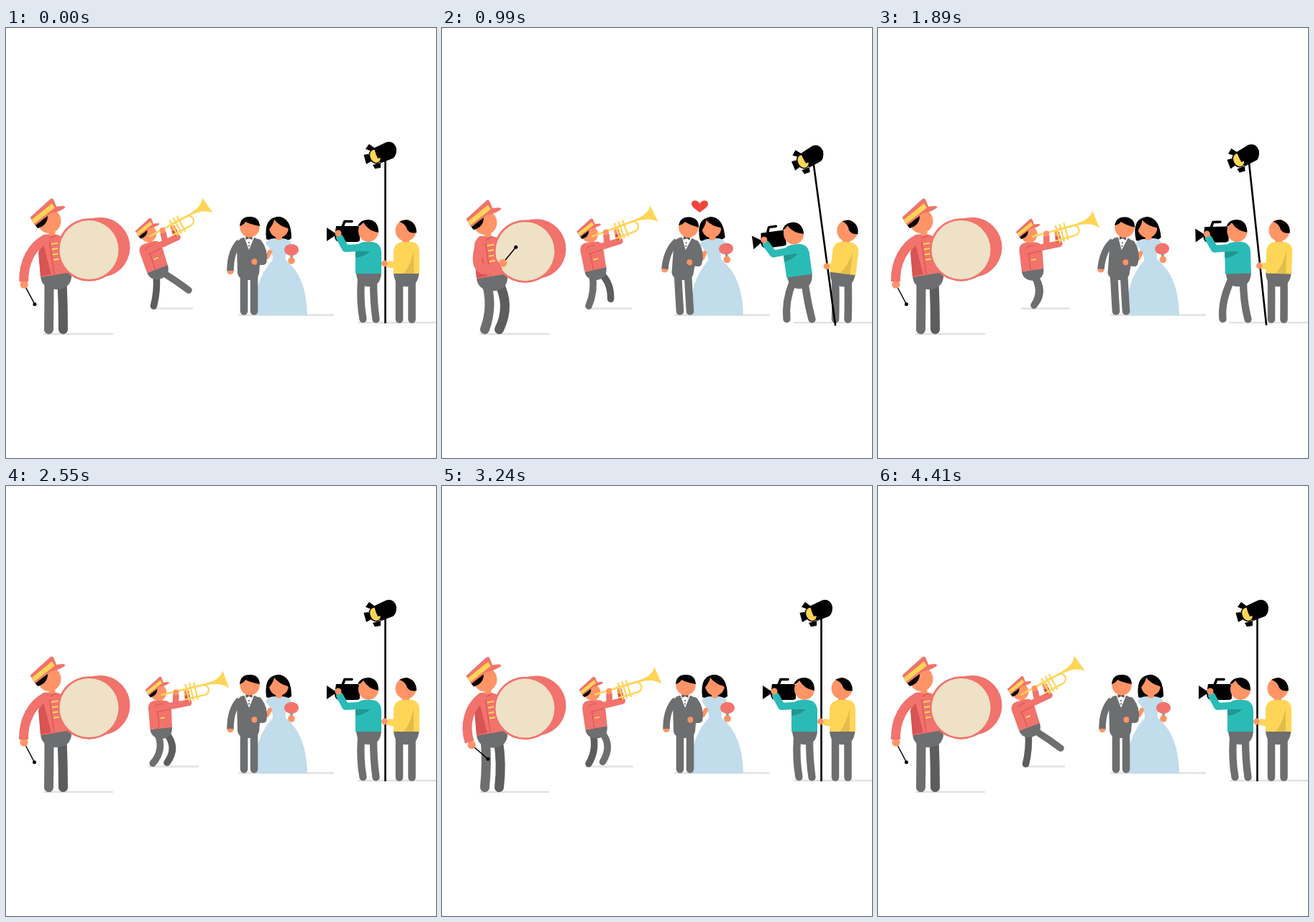
Animation of 598 by 597 pixels, one loop 4.44 s. Source, as an HTML page with a canvas:

```html
<!DOCTYPE html>
<html lang="en">
<head>
<meta charset="utf-8">
<title>Wedding procession</title>
<style>
html, body { margin: 0; width: 100%; height: 100%; overflow: hidden; background: #fff; }
canvas { display: block; }
</style>
</head>
<body>
<canvas id="stage" width="598" height="597"></canvas>
<script>
const ctx = document.getElementById('stage').getContext('2d');
const LOOP = 4440, STEP = 740, BEAT = 580;
const CORAL = '#f1736c', RED = '#d95454', YELLOW = '#ffd557', SKIN = '#ff9466',
      GREY = '#6d6e70', DARK = '#5c5d5f', TEAL = '#2bbbb6', DRESS = '#c1dceb', BLACK = '#000';

const clamp = x => Math.max(0, Math.min(1, x));
const smooth = x => (x = clamp(x), x * x * (3 - 2 * x));
const linear = x => x;
const ramp = (t, from, to) => smooth((t - from) / (to - from));

// Interpolates rows of [time, ...values].
function mix(rows, t, ease = smooth) {
  const i = rows.findIndex(r => r[0] > t);
  if (i < 0) return rows[rows.length - 1].slice(1);
  const a = rows[i - 1], b = rows[i], k = ease((t - a[0]) / (b[0] - a[0]));
  return a.slice(1).map((v, j) => v + (b[j + 1] - v) * k);
}

function fill(color, d) {
  ctx.fillStyle = color;
  ctx.fill(new Path2D(d));
}

function line(color, width, d, cap = 'round') {
  ctx.strokeStyle = color;
  ctx.lineWidth = width;
  ctx.lineCap = cap;
  ctx.lineJoin = 'round';
  ctx.stroke(new Path2D(d));
}

function oval(color, x, y, rx, ry = rx, turn = 0) {
  ctx.fillStyle = color;
  ctx.beginPath();
  ctx.ellipse(x, y, rx, ry, turn, 0, 7);
  ctx.fill();
}

// Draws with a shift and a turn about the pivot (x, y).
function pose(x, y, dx, dy, degrees, draw) {
  ctx.save();
  ctx.translate(x + dx, y + dy);
  ctx.rotate(degrees * Math.PI / 180);
  ctx.translate(-x, -y);
  draw();
  ctx.restore();
}

const leg = (color, width, hx, hy, kx, ky, fx, fy) =>
  line(color, width, `M${hx} ${hy}Q${kx} ${ky} ${fx} ${fy}`);
const ground = (from, to, y) => line('#e2e2e3', 2.4, `M${from} ${y}H${to}`);

function bandHead() {
  line(SKIN, 9, 'M64 278V288', 'butt');
  oval(SKIN, 60, 268, 16.5, 17);
  fill(BLACK, 'M40 273L58 261Q58 274 44 278Z');
  fill(CORAL, 'M33.5 263L61 238Q65 234.500 67 240L70 248L79 247Q85 248 80 251Q70 257 62 257L40 273Z');
  fill(YELLOW, 'M36 266L64 243.500L68 250L40 271.500Z');
  line(CORAL, 2.5, 'M41 272.500L68 251');
}

// Arm curve controls, wrist, hand and stick tip by swing amount.
const SWING = [
  [0, 36, 303, 24, 325, 24.5, 352, 25, 356, 39.5, 383.5],
  [.2, 38, 305, 29, 330, 36, 356, 39, 360, 61, 382],
  [.75, 42, 318, 44, 342, 66, 350, 69.5, 352.5, 100, 343],
  [1, 43, 328, 50, 347, 82, 327, 86, 324, 103, 301]
];

function swingAt(t) {
  const since = t < 2 * BEAT ? t : t - 2600;
  if (since < 0 || since > 2 * BEAT) return 0;
  const u = since % BEAT / BEAT;
  return u < .68 ? Math.sin(Math.PI / 2 * u / .68) : (1 + Math.cos(Math.PI * (u - .68) / .32)) / 2;
}

function drummer(t) {
  const p = swingAt(t), dip = 2.2 * p;
  ground(53, 148, 424.8);
  leg(DARK, 13, 78, 352, 79.5 + 17 * p, 385, 79.5, 418.5);
  leg(GREY, 13, 60 + p, 352, 60 + 12 * p, 385, 59.5, 418.5);
  pose(0, 0, 0, dip, 0, () => {
    fill(GREY, 'M48 344L91 337Q94 362 70 363Q49 362 48 344Z');
    fill(CORAL, 'M48 346L45 300Q46 286 63 286Q80 286 86 300L91 339Z');
    fill(RED, 'M45 312L52 300L63 342L48 345Z');
    line(RED, 1.3, 'M69 288L60 293L67 341');
    for (let i = 0; i < 4; i++) line(YELLOW, 2.2, `M${63 + i} ${300 + i * 7.3}l9.500-1.500`, 'butt');
    line(CORAL, 83, 'M116 307L131 304.500');
    oval(CORAL, 115.5, 308, 43.7);
    oval('#eee1c6', 115.5, 308, 41);
    bandHead();
  });
  const [ax, ay, bx, by, wx, wy, hx, hy, tx, ty] = mix(SWING, p, linear);
  line(BLACK, 1.5, `M${hx} ${hy}L${tx} ${ty}`);
  oval(BLACK, tx, ty, 2.5);
  oval(SKIN, hx, hy, 5.6);
  line(CORAL, 13, `M55 ${293 + dip}C${ax} ${ay} ${bx} ${by} ${wx} ${wy}`, 'butt');
  oval(CORAL, 55, 293 + dip, 6.5);
}

// Hip x, knee control and foot over two steps.
const WALK = [
  [0, 222, 238, 352, 254, 364], [130, 222, 238, 352, 254, 364],
  [250, 222, 235, 354, 235, 376], [285, 222, 238, 361, 222, 384],
  [330, 222, 240, 363, 224, 384], [410, 216, 231, 365, 217, 385],
  [450, 211, 222, 365, 215, 384], [620, 209, 210, 366, 206, 386],
  [990, 209, 213, 365, 204, 386], [1070, 210, 221, 366, 204, 385],
  [1150, 216, 232, 365, 219, 382], [1190, 221, 236, 362, 223, 378],
  [1360, 222, 238, 352, 254, 364], [1480, 222, 238, 352, 254, 364]
];

function trumpet() {
  ctx.save();
  ctx.translate(217, 290);
  ctx.rotate(-.235);
  line(YELLOW, 2.6, 'M0 0H72');
  line(YELLOW, 2.3, 'M30 0H58A7 7 0 0 1 58 14H30');
  for (const x of [35, 41, 47]) line(YELLOW, 2.3, `M${x}-6V17`);
  fill(YELLOW, 'M64-1.300Q85-2 90-13L93 13Q84 2 64 1.300Z');
  ctx.restore();
}

function trumpeter(t) {
  const u = t % STEP, lean = u < 340 ? ramp(u, 150, 340) : 1 - ramp(u, 340, 660), back = 1 - lean;
  ground(208 - 9 * lean, 259 + 8 * lean, 389.5);
  const stride = (color, time) => {
    const [hx, kx, ky, fx, fy] = mix(WALK, time % (2 * STEP), linear);
    leg(color, 9.5, hx, 342, kx, ky, fx, fy);
  };
  stride(DARK, t + STEP);
  stride(GREY, t);
  pose(212, 286.5, -14 * back, -back, 0, () => {
    ctx.translate(212, 286.5);
    ctx.scale(.69, .69);
    ctx.translate(-60, -268);
    bandHead();
  });
  pose(215, 345, -3 * back, -2 * back, -15 * back, () => {
    fill(GREY, 'M200.500 338L231 334Q232 350 216 351Q202 350 200.500 338Z');
    fill(CORAL, 'M200.500 338L198 308Q198 299 207 298L222 298Q230 300 230 306L231 335Z');
    line(RED, 1.1, 'M211 313L213 336');
    line(YELLOW, 2, 'M214.500 322.500L221 321.500', 'butt');
    line(CORAL, 9, 'M232 305L254 301');
    line(RED, 7.5, 'M253 299L252 290', 'butt');
    oval(SKIN, 251.5, 287, 3.8);
    trumpet();
    line(CORAL, 8.5, 'M206 309L236 304L236.500 291');
    line(RED, 1.1, 'M207 306Q209 303 218 302.500M209 314L228 310');
    oval(SKIN, 236.5, 286.5, 4);
  });
}

function bride(k) {
  fill(DRESS, 'M371 322H389Q418 345 419 399H347Q343 352 371 322Z');
  pose(380, 330, 0, 0, -5 * k, () => {
    fill(BLACK, 'M362 293Q358 262 380 262Q397 264 397 292Q391 297 387 293H370Q365 295 362 293Z');
    oval(SKIN, 379.5, 277, 13.5, 14);
    line(SKIN, 9, 'M379.500 286V297', 'butt');
    fill(BLACK, 'M363 283Q365 264 379 262Q395 264 395 285L392 278Q380 275 373 266Q372 273 363 283Z');
    line(SKIN, 6, 'M394 302L400 311', 'butt');
    fill(DRESS, 'M361 299Q364 292 374 292Q379 297 385 292Q395 293 397 300L393 308Q386 315 390 326H370Q374 313 361 299Z');
    line(SKIN, 6, 'M367 311L363 318');
    line('#58aaa1', 3.5, 'M397 313V320', 'butt');
    oval(CORAL, 397, 308, 10, 8);
    oval(SKIN, 397, 323, 4.8);
  });
}

function groom(k) {
  const hip = -3 * k;
  for (const x of [331, 345]) leg(GREY, 10.6, x + hip, 342, x + hip / 2, 370, x, 393.3);
  pose(338, 345, hip, 0, 5.8 * k, () => {
    oval(SKIN, 312, 337.5, 4.7);
    line(GREY, 9.5, 'M325 297Q312 310 312 337', 'butt');
    line(GREY, 10, 'M351 298Q360 310 357.500 324');
    fill(GREY, 'M321 304Q321 293 330 291H346Q355 294 355 304L352 341Q350 350 337 350Q324 350 322 341Z');
    oval(SKIN, 345.5, 324.5, 4.2);
    line(GREY, 9, 'M349 324.500H357', 'butt');
    line(SKIN, 9, 'M338 283V292', 'butt');
    fill('#fff', 'M331.500 291H345L338 308Z');
    fill('#555', 'M333.500 289L338 291L342.500 289V294L338 292L333.500 294Z');
    oval('#555', 338, 298, 1);
    oval('#555', 338, 302.5, 1);
    oval(SKIN, 339, 276.5, 13.7, 14);
    fill(BLACK, 'M325 275Q326 262 339 262Q352 262 353 275Q341 273 333 269Q331 273 325 275Z');
  });
}

function couple(t) {
  const k = ramp(t, 0, 520) - ramp(t, 2050, 2540);
  ground(324, 455, 398.5);
  bride(k);
  groom(k);
  const size = ramp(t, 600, 780) - ramp(t, 1450, 1630);
  if (size <= 0) return;
  ctx.save();
  ctx.translate(358.5, 247);
  ctx.scale(size, size);
  fill('#ef453d', 'M0 9C-7 4-11.500 1-11.500-3C-11.500-9-2.500-9 0-3C2.500-9 11.500-9 11.500-3C11.500 1 7 4 0 9Z');
  ctx.restore();
}

function cameraman(t) {
  const [dx, dy, turn] = mix([[0, 0, 0, 0], [450, -5.5, 1, -5], [990, -6.5, 3, -7.7],
    [1450, -6.5, 3, -7.7], [1890, -3, 0, -1.5], [2500, 0, 0, 0]], t);
  const step = ramp(t, 0, 380) - ramp(t, 1930, 2350);
  leg(GREY, 10.3, 494 + dx, 350 + dy, 492 - 15 * step, 380, 496.5 - 17 * step, 404);
  leg(GREY, 10.3, 511 + dx, 350 + dy, 511 - 3 * step, 380, 514.5, 404.3);
  pose(504, 345, dx, dy, turn, () => {
    fill(GREY, 'M487 340H522Q521 359 504.500 359Q488 359 487 340Z');
    fill(TEAL, 'M486 341V309Q487 298 498 297H510Q521 299 522 310V341Z');
    fill('#219690', 'M486 310H506Q498 318 486 319Z');
    fill(BLACK, 'M459 275H489Q492 276 492 279V295Q491 297 488 297H464Q457 296 457 289ZM446 277L458 285V288L446 296Z');
    line(BLACK, 3.5, 'M468 276L471 268.500H481');
    oval(SKIN, 504, 282, 14, 15);
    fill(BLACK, 'M489 276Q492 266 504 266Q518 267 518 284Q504 282 497 270Q494 274 489 276Z');
    line(TEAL, 10, 'M499 304.500L472 306L464 291');
    oval(SKIN, 462, 285, 4.5);
  });
}

function lamp() {
  line(BLACK, 2.6, 'M527.500 180V410', 'butt');
  fill(BLACK, 'M500 168L505 161L513 167L508 171ZM497.500 176L504 175L508 185L501 189ZM510 190L521 187V194L513 195.500Z');
  oval(BLACK, 513.5, 178, 9, 10.5, -.4);
  fill(BLACK, 'M511 167L529 158.500Q540 156 543 168Q543 178 538 181L521 187.500Z');
  oval(YELLOW, 513.5, 178, 7, 9.3, -.4);
  fill(BLACK, 'M512 167L525 165L523 180L517 181Q514 175 512 167Z');
}

function assistant(t) {
  const [turn, tilt, hx, hy] = mix([[0, 0, 0, 527.5, 327], [450, 5, -4.3, 533, 330],
    [990, 7, -7.7, 536, 331], [1450, 7, -7.7, 536, 331], [1890, 1.8, -6.1, 531.3, 330], [2540, 0, 0, 527.5, 327]], t);
  for (const x of [547, 564.5]) leg(GREY, 10.5, x, 350, x + turn / 8, 375, x, 404.5);
  pose(557, 345, 0, 0, turn, () => {
    fill(GREY, 'M539 340H574.500Q573 359 557 359Q540 359 539 340Z');
    line(SKIN, 10, 'M556 290V299', 'butt');
    fill(YELLOW, 'M539 341V309Q541 298 551 297H565Q575 299 575 310V341Z');
    fill('#e3bd4b', 'M567 309V341H553Q562 331 567 309Z');
    oval(SKIN, 556, 281, 14.5, 15);
    fill(BLACK, 'M547 269Q556 265 560 267Q571 271 571 284Q562 286 558 280Q556 272 547 269Z');
  });
  pose(527.5, 327, hx - 527.5, hy - 327, tilt, lamp);
  line(YELLOW, 9, `M549 330.500L${hx + 3} ${hy + .5}`, 'butt');
  oval(SKIN, hx - 1, hy, 4.4);
}

function draw(now) {
  const t = now % LOOP;
  ctx.fillStyle = '#fff';
  ctx.fillRect(0, 0, 598, 597);
  drummer(t);
  trumpeter(t);
  couple(t);
  ground(490, 598, 409);
  cameraman(t);
  assistant(t);
}

function tick() {
  draw(performance.now());
  requestAnimationFrame(tick);
}
tick();
</script>
</body>
</html>
```
